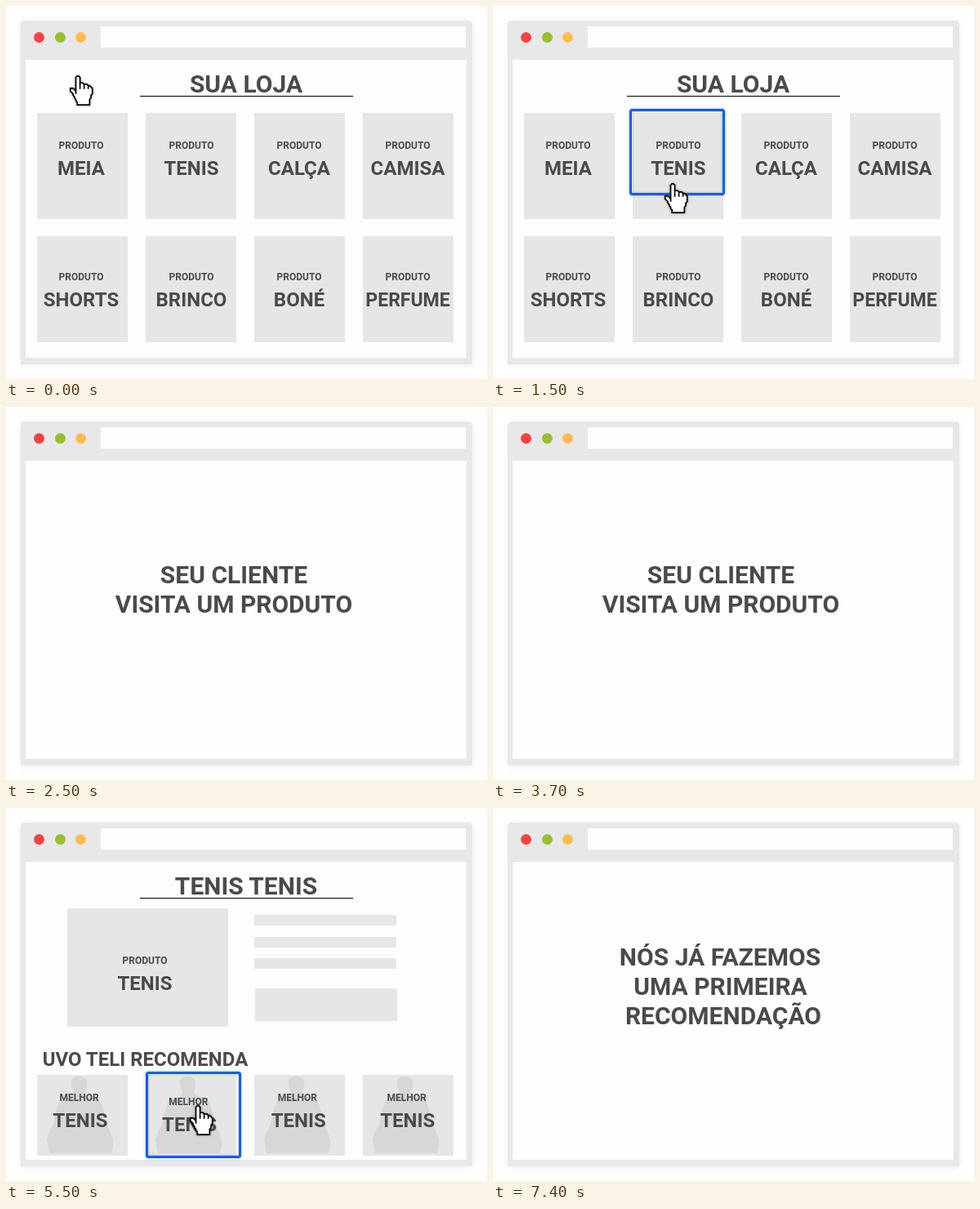
These frames come from a looping animation (589x457 px, 8 s). An HTML page:

```html
<!DOCTYPE html>
<html lang="pt">
<head>
<meta charset="utf-8">
<title>Sua loja</title>
<style>
  html, body { margin: 0; width: 100%; height: 100%; overflow: hidden; background: #fff; }
  svg { display: block; width: 589px; height: 457px; }
  text { font-family: Roboto, sans-serif; font-weight: 700; fill: #4a4a4a; text-anchor: middle; }
  .panel { fill: #e6e6e6; }
  .window { fill: #e8e8e8; filter: drop-shadow(0 1px 4px rgba(0, 0, 0, .08)); }
  #frame { fill: none; stroke: #0060f8; stroke-width: 3; filter: drop-shadow(0 0 1.5px rgba(0, 0, 0, .3)); }
  #hand { fill: #fff; stroke: #000; filter: drop-shadow(0 .5px 1px rgba(0, 0, 0, .5)); }
</style>
</head>
<body>
<svg viewBox="0 0 589 457">
  <defs>
    <path id="person" fill="#d7d7d7" d="M42 6Q45 2 51 2Q59 2 61 8Q62 14 59 20L61 25
      Q74 28 78 33Q82 45 85 57L93 79Q94 86 91 96H15L12 79Q14 70 20 61
      Q22 46 27 34Q31 29 43 26L45 21Q41 14 42 6Z"/>
  </defs>
  <path class="window" d="M18 439V23q0-5 5-5H566q5 0 5 5V439Z"/>
  <path fill="#fefefe" d="M116 25h447v26H116ZM24 66h540v365H24Z"/>
  <circle cx="40.5" cy="38.5" r="6.5" fill="#ff4141"/>
  <circle cx="66.5" cy="38.5" r="6.5" fill="#9abe2f"/>
  <circle cx="91.5" cy="38.5" r="6.5" fill="#ffbd4d"/>
  <g id="page"></g>
  <rect id="frame" width="114" height="103" rx="2"/>
  <g id="cursor">
    <path id="hand" transform="scale(1.68)" d="M4.5 13.5V1.5L5.5 .5H6.5L7.5 1.5V5.5H9.5L10.5 6.5H12.5
      L13.5 7.5H14.5L16.5 9.5V13.5L15.5 14.5V16.5L14.5 17.5V21.5H5.5V19.5L4.5 18.5V17.5L3.5 16.5V15.5
      L2.5 14.5V13.5L.5 11.5V9.5H2.5L4.5 11.5M7.5 5.5V10M10.5 6.5V10M13.5 7.5V10"/>
  </g>
</svg>
<script>
const text = (x, y, size, words) => `<text x="${x}" y="${y}" font-size="${size}">${words}</text>`;
const panel = (x, y, w, h) => `<rect class="panel" x="${x}" y="${y}" width="${w}" height="${h}"/>`;
const label = (x, y, kind, name, size = 24) => text(x, y - 32, 12, kind) + text(x, y, size, name);
const heading = words => text(294, 106, 30, words) + '<path d="M164 110h261v1H164Z"/>';
const columnX = i => 38 + 133 * i;

const products = ['MEIA', 'TENIS', 'CALÇA', 'CAMISA', 'SHORTS', 'BRINCO', 'BONÉ', 'PERFUME'];
const labelX = [92, 227, 359, 492];

const shop = heading('SUA LOJA') + products.map((name, i) => {
  const col = i % 4, row = i >> 2;
  return panel(columnX(col), row ? 282 : 131, 111, 130) +
    label(labelX[col], 207 + 161 * row, 'PRODUTO', name, name === 'PERFUME' ? 23 : 24);
}).join('');

const recommendation = i => {
  const x = 91 + 133.6 * i, y = i === 1 ? 396 : 391;
  return panel(columnX(i), 327, 111, 99) +
    `<use href="#person" x="${columnX(i)}" y="327"/>` +
    text(x - 1.3, y - 32, 12, 'MELHOR') + text(x, y, 24, 'TENIS');
};

const product = heading('TENIS TENIS') +
  panel(75, 123, 197, 145) + label(170, 223, 'PRODUTO', 'TENIS') +
  [131, 158, 184].map(y => panel(304, y, 174, 13)).join('') +
  panel(305, 221, 174, 40) +
  text(170.5, 316, 24, 'UVO TELI RECOMENDA') +
  [0, 1, 2, 3].map(recommendation).join('');

const visit = text(279, 216, 30, 'SEU CLIENTE') + text(279, 252, 30, 'VISITA UM PRODUTO');
const advice = text(278, 193, 30, 'NÓS JÁ FAZEMOS') + text(278.5, 229, 30, 'UMA PRIMEIRA') +
  text(282, 265, 30, 'RECOMENDAÇÃO');

// Each step holds until its end time; cursor and frame are top-left positions.
const steps = [
  { end: 500, page: shop, cursor: [78, 85] },
  { end: 1500, page: shop, cursor: [210, 217] },
  { end: 2500, page: shop, cursor: [210, 217], frame: [168.5, 127.5] },
  { end: 4500, page: visit },
  { end: 5500, page: product, cursor: [210, 217] },
  { end: 6500, page: product, cursor: [225, 364], frame: [172.5, 324.5] },
  { end: 8000, page: advice },
];

const byId = id => document.getElementById(id);
const place = (id, position) => {
  byId(id).style.display = position ? '' : 'none';
  if (position) byId(id).setAttribute('transform', `translate(${position})`);
};

const start = performance.now();
let current;
function draw() {
  const time = (performance.now() - start) % 8000;
  const step = steps.find(s => time < s.end);
  if (step !== current) {
    current = step;
    byId('page').innerHTML = step.page;
    place('cursor', step.cursor);
    place('frame', step.frame);
  }
  requestAnimationFrame(draw);
}
draw();
</script>
</body>
</html>
```
